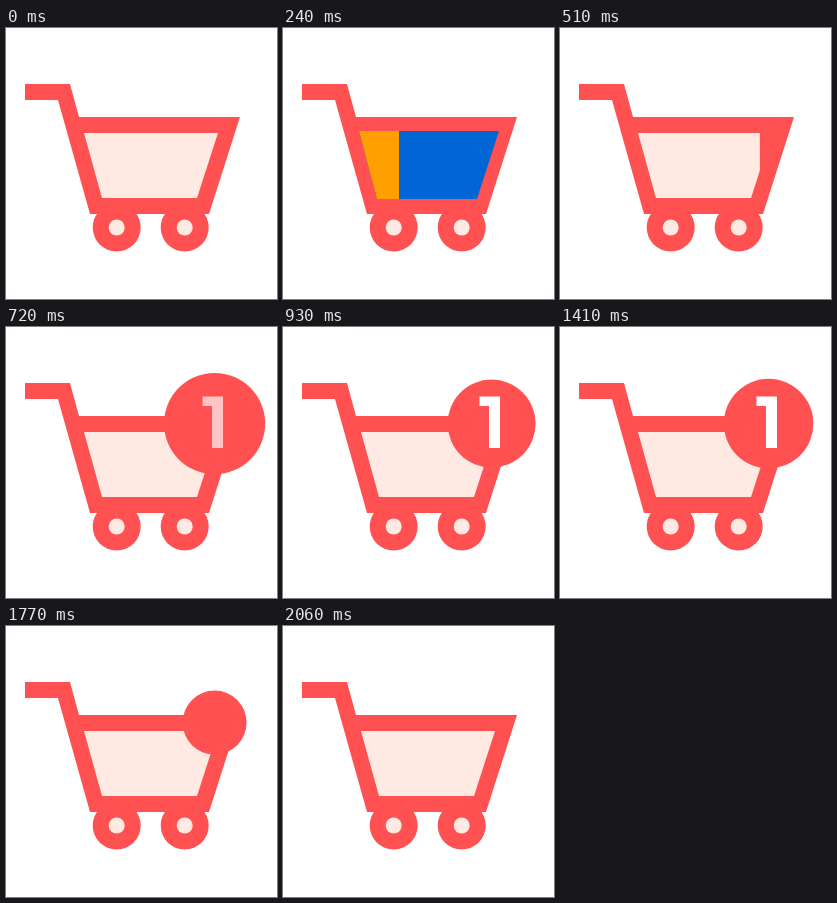
These frames come from a looping animation (271x271 px, 3090 ms). An HTML page:

```html
<!DOCTYPE html>
<html lang="en">
<head>
<meta charset="utf-8">
<title>Add to cart</title>
<style>
  html, body { margin: 0; width: 100%; height: 100%; overflow: hidden; background: #fff; }
  svg { display: block; width: 100%; height: 100%; }
</style>
</head>
<body>
<svg viewBox="0 0 271 271" role="img" aria-label="Shopping cart with one item">
  <defs>
    <clipPath id="basket"><path d="M76 103H216L194 171H94Z"/></clipPath>
    <clipPath id="inner"><path d="M78 105H212L191 170H96Z"/></clipPath>
  </defs>
  <g fill="#ff5151">
    <path d="M19 56H64L73 89H234L203 186H84L52 72H19Z"/>
    <circle cx="110.7" cy="199.5" r="24"/>
    <circle cx="178.7" cy="199.5" r="24"/>
  </g>
  <g fill="#ffeae3">
    <circle cx="110.7" cy="199.5" r="8"/>
    <circle cx="178.7" cy="199.5" r="8"/>
    <path d="M78 105H212L191 170H96Z"/>
  </g>
  <g id="bands"></g>
  <circle id="badge" cx="208.6" cy="96.6" fill="#ff5151"/>
  <path id="one" d="M196.5 69.5H217V121H206V79H196.5Z" fill="#fff"/>
</svg>
<script>
const LOOP = 3090, STEP = 30;
const SWEEP = 103.9, SWEEP_START = 2.5;
const LEFT = 76, SPAN = 140;
const RED = '#ff5151', BLUE = '#0066d6', ORANGE = '#ff9f00', PINK = '#ffeae3';
const REST = 44, PEAK = 52.5;

const $ = id => document.getElementById(id);
const clamp = v => Math.max(0, Math.min(1, v));
const ramp = (t, a, b) => clamp((t - a) / (b - a));
const lerp = (a, b, u) => a + (b - a) * u;

const bands = [RED, BLUE, ORANGE, RED, PINK].map(color => {
  const rect = document.createElementNS('http://www.w3.org/2000/svg', 'rect');
  const attrs = { x: LEFT, y: 100, height: 75, width: 0, fill: color,
    'clip-path': `url(#${color === PINK ? 'inner' : 'basket'})` };
  for (const k in attrs) rect.setAttribute(k, attrs[k]);
  $('bands').append(rect);
  return rect;
});

// The motion advances in 30 ms steps and lingers on the last two.
function stepped(t) {
  if (t >= 2060) return LOOP;
  if (t >= 1930) return 1830;
  return Math.min(1800, Math.floor((t + 0.01) / STEP) * STEP);
}

function radius(t) {
  if (t < 660) return PEAK * ramp(t, 507, 660);
  if (t < 1380) return lerp(PEAK, REST, ramp(t, 660, 930));
  if (t < 1695) return lerp(REST, PEAK, ramp(t, 1380, 1695));
  return PEAK * (1 - ramp(t, 1695, 1887));
}

function draw(time) {
  const t = stepped(time);
  const sweep = (t - SWEEP_START) / SWEEP;
  const sweeping = sweep < bands.length;
  bands.forEach((band, i) =>
    band.setAttribute('width', sweeping ? SPAN * clamp(sweep - i) : 0));
  $('badge').setAttribute('r', radius(t));
  $('one').setAttribute('opacity', ramp(t, 660, 750) * (1 - ramp(t, 1605, 1695)));
}

const start = performance.now();
function tick() {
  draw((performance.now() - start) % LOOP);
  requestAnimationFrame(tick);
}
draw(0);
requestAnimationFrame(tick);
</script>
</body>
</html>
```
